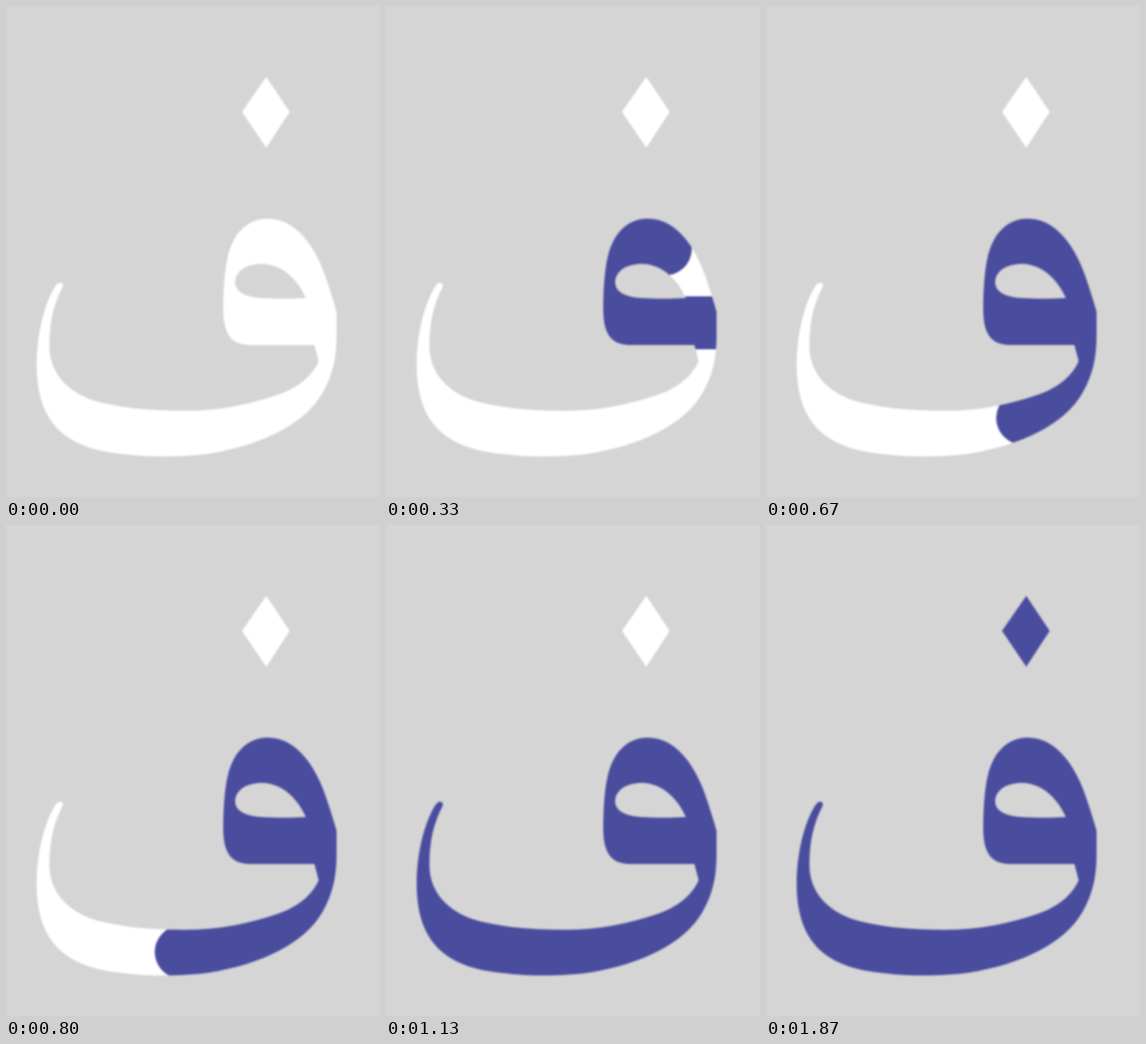
These frames come from a looping animation (439 px wide and 575 px high, 4 s). An HTML page:

```html
<!DOCTYPE html>
<html lang="ar">
<head>
<meta charset="utf-8">
<title>Letter stroke</title>
<style>
  html, body { margin: 0; width: 100%; height: 100%; overflow: hidden; background: #d5d5d5; }
  svg { display: block; width: 100vw; height: 100vh; }
  .pen { fill: none; stroke: #4a4c9e; stroke-width: 62; stroke-linecap: round; stroke-linejoin: round; }
  .soft { filter: blur(0.9px); }
</style>
</head>
<body>
<svg viewBox="0 0 439 575">
  <clipPath id="letter">
    <path clip-rule="evenodd" d="M307 249C345 249 368 290 380 332C384 344 386 351 388 358
      V385C388 411 384 432 371 454C350 490 300 514 240 524C215 528 170 529 140 525
      C68 519 36 487 36 420C36 385 45 348 58 328Q62 322 66 325Q68 327 65 332
      C56 350 51 370 51 398C51 425 66 448 100 461C128 470 165 474 210 474
      C250 474 285 467 320 455C345 446 360 432 367 416L362 397L288 397
      C267 397 255 388 255 355C255 330 257 308 260 295C266 268 282 249 307 249Z
      M269 322C271 308 285 302 301 302C325 303 342 320 352 342
      C335 343 315 343 300 342C284 341 268 336 269 322Z"/>
  </clipPath>
  <clipPath id="dot"><path d="M305.5 83L333 124L305.5 166L277 124Z"/></clipPath>
  <g class="soft">
    <g clip-path="url(#letter)">
      <rect width="439" height="575" fill="#fff"/>
      <path class="pen" id="body"/>
    </g>
    <g clip-path="url(#dot)">
      <rect width="439" height="575" fill="#fff"/>
      <path class="pen" id="mark"/>
    </g>
  </g>
</svg>
<script>
const LOOP = 4000, STEP = 200 / 3;
const HIDDEN = -50; // pushes the round cap off the path

// parts: [path data, step at which the pen reaches its end]
function draw(id, startStep, parts) {
  const path = document.getElementById(id);
  const stops = [[startStep, 0]];
  let d = '';
  for (const [piece, step] of parts) {
    d += piece;
    path.setAttribute('d', d);
    stops.push([step, path.getTotalLength()]);
  }
  const total = stops[stops.length - 1][1];
  path.style.strokeDasharray = `${total} ${total * 2}`;

  const key = (step, len) => ({
    offset: step * STEP / LOOP,
    strokeDashoffset: `${total - len}px`,
    easing: 'steps(1, end)'
  });
  const keys = [key(0, HIDDEN)];
  for (let i = 1; i < stops.length; i++) {
    const [s0, l0] = stops[i - 1], [s1, l1] = stops[i];
    for (let s = s0 + 1; s <= s1; s++) {
      keys.push(key(s, l0 + (l1 - l0) * (s - s0) / (s1 - s0)));
    }
  }
  keys.push({ ...key(0, total), offset: 1 });
  // the small lead absorbs rounding of the step times
  path.animate(keys, { duration: LOOP, iterations: Infinity, delay: -4 });
}

draw('body', 0, [
  ['M390 371H283C268 371 261 350 261 328', 3],
  ['C261 300 278 276 305 276C345 276 377 350 374 423', 8],
  ['C360 470 290 494 206 500', 12],
  ['C120 505 44 480 43 412C43 380 50 350 60 325', 17]
]);
draw('mark', 25, [['M305.5 82V142', 28]]);
</script>
</body>
</html>
```
